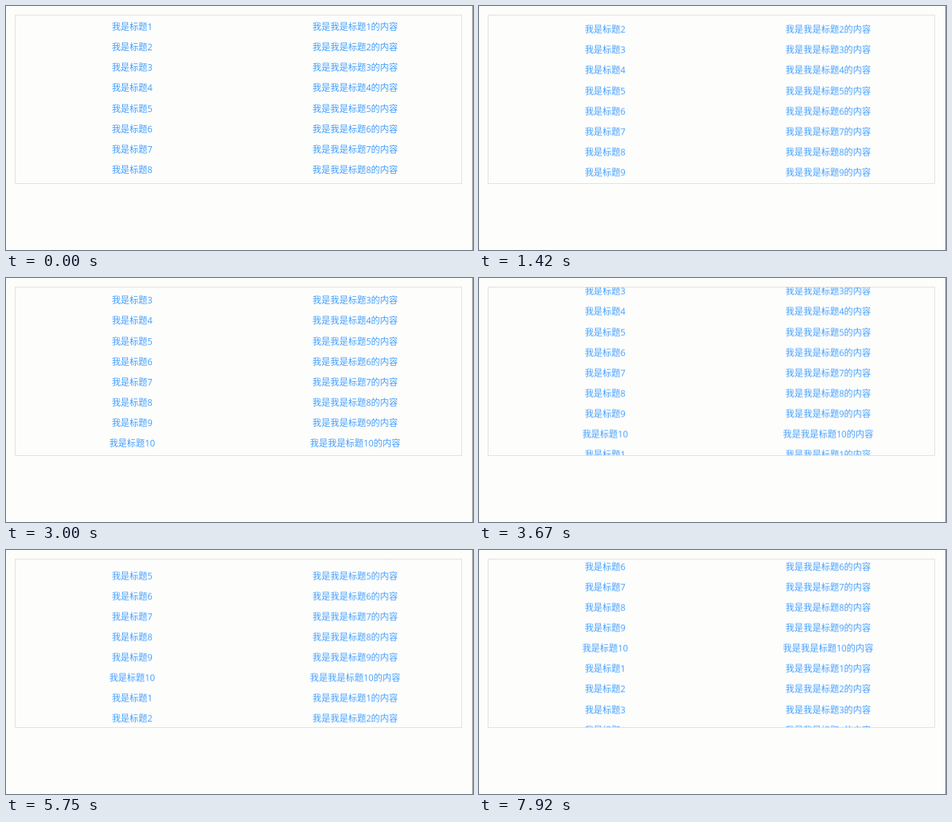
Recreate the animation shown at these times as an HTML page. Size 640x336 px, loop 8000 ms.

```html
<!DOCTYPE html>
<html lang="zh-CN">
<head>
<meta charset="utf-8">
<title>滚动列表</title>
<style>
  html, body {
    margin: 0;
    width: 100%;
    height: 100%;
    overflow: hidden;
    background: #fdfdfc;
  }
  .stage {
    position: relative;
    box-sizing: border-box;
    width: 640px;
    height: 336px;
    overflow: hidden;
    border-right: 1px solid #909090;
  }
  .box {
    position: absolute;
    left: 12px;
    top: 12px;
    box-sizing: border-box;
    width: 613px;
    height: 233px;
    overflow: hidden;
    border: 1px solid #dfe2dc;
  }
  .list {
    --row: 28.14px;
    position: absolute;
    left: 7px;
    top: 2px;
    width: 611.4px;
    font: 12.24px/var(--row) "Open Sans", "Noto Sans CJK SC", "Noto Sans CJK", sans-serif;
    color: #409eff;
    will-change: transform;
    /* slight lead keeps steps on the 12 fps ticks rounded to 10 ms */
    animation: scroll 8s -4ms infinite;
  }
  .row {
    display: flex;
    height: var(--row);
    white-space: nowrap;
  }
  .row span {
    flex: 0 0 50%;
    text-align: center;
  }
  @keyframes scroll {
    0% {
      transform: translateY(0);
      animation-timing-function: steps(3);
    }
    3.125% {
      transform: translateY(-2.5px);
      animation-timing-function: steps(93);
    }
    100% { transform: translateY(-147.9px); }
  }
</style>
</head>
<body>
<div class="stage">
  <div class="box"><div class="list" id="list"></div></div>
</div>
<script>
  const ITEMS = 10;
  const ROWS = 15;

  const rowHtml = (_, i) => {
    const title = `标题${i % ITEMS + 1}`;
    return `<div class="row"><span>我是${title}</span><span>我是我是${title}的内容</span></div>`;
  };

  document.getElementById('list').innerHTML = Array.from({ length: ROWS }, rowHtml).join('');
</script>
</body>
</html>
```
